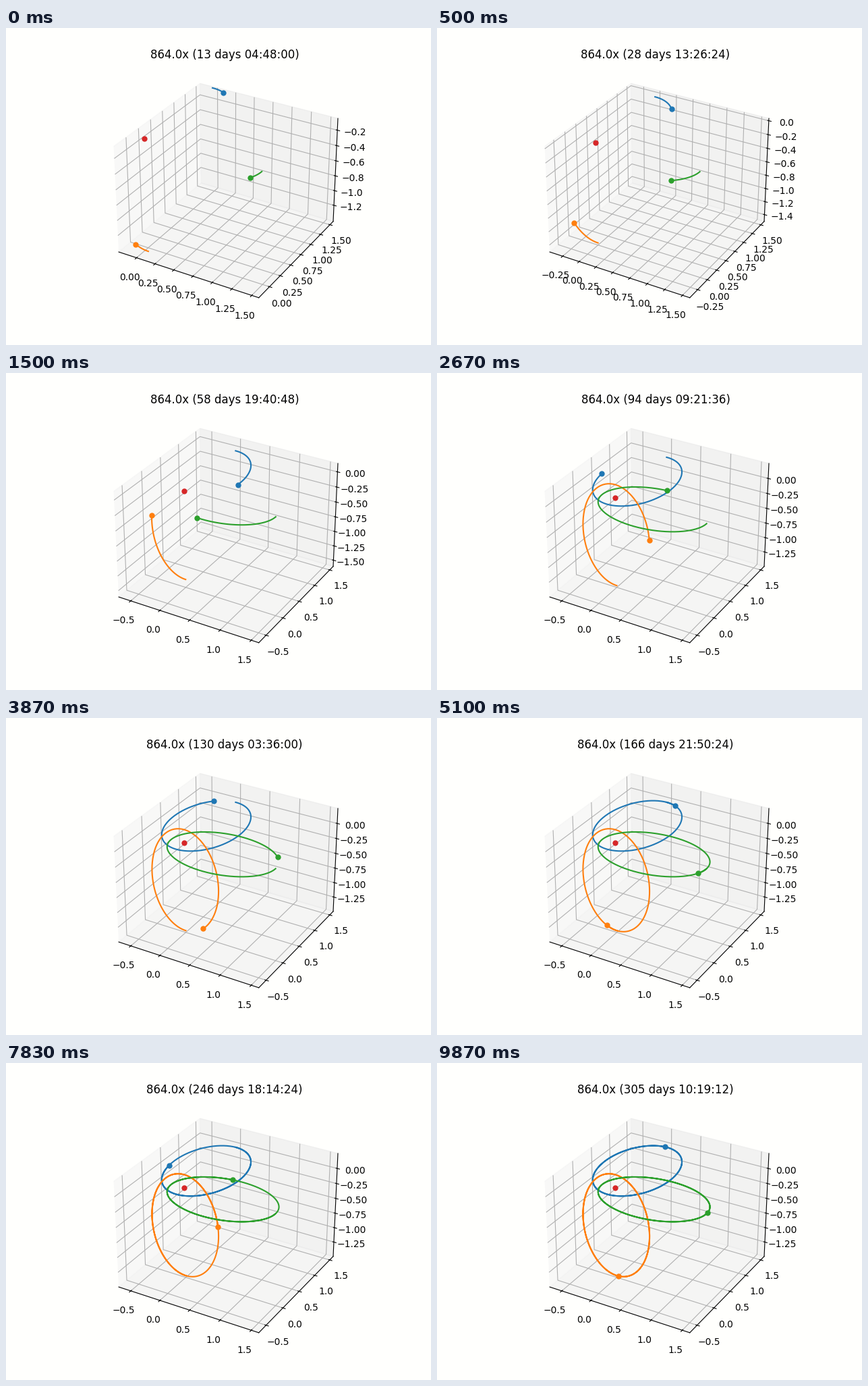
These frames come from a looping animation (630x470 px, 9910 ms). A matplotlib script:

```python
import numpy as np
import matplotlib.pyplot as plt
from matplotlib.animation import FuncAnimation
from matplotlib.ticker import MaxNLocator

W, H, DPI = 630, 470, 100
FRAMES, LOOP_MS = 298, 9910
SPEED = 864

# Kepler ellipse, released at its far point (lengths in 1e11 m, time in days)
FAR, PERIOD, A = 1.471, 153.77, 0.843
ECC = FAR / A - 1
B = A * np.sqrt(1 - ECC ** 2)
ANOMALY = np.linspace(0, 6 * np.pi, 6000)
MEAN = ANOMALY + ECC * np.sin(ANOMALY)

STEP = 0.5       # days between trail points
LAG = 3.5        # the view limits trail behind the bodies
MARGIN = 1.1 * 25 / 24
BACKGROUND = "#fffffd"

# Simulated days at a few frames; the clock slows slightly
CLOCK_FRAMES = [0, 15, 45, 80, 153, 235, 296]
CLOCK_DAYS = [13.20, 28.56, 58.82, 94.39, 166.91, 246.76, 305.43]


class InnerLocator(MaxNLocator):
    """Ticks kept out of the outer padding of the view."""

    def __call__(self):
        lo, hi = self.axis.get_view_interval()
        pad = (hi - lo) / 50
        return [t for t in self.tick_values(lo, hi)
                if lo + pad <= t <= hi - pad]


def bodies(days):
    """Positions of the three bodies, shaped (body, xyz, time)."""
    e = np.interp(2 * np.pi * days / PERIOD, MEAN, ANOMALY)
    along, across = A * (ECC + np.cos(e)), B * np.sin(e)
    zero = np.zeros_like(along)
    return np.array([(across, along, zero),
                     (-across, zero, -along),
                     (along, -across, zero)])


def trail(day):
    return bodies(np.append(np.arange(0, day, STEP), day))


def set_view(day):
    seen = trail(day)
    lo, hi = seen.min(axis=(0, 2)), seen.max(axis=(0, 2))
    mid = (lo + hi) / 2
    half = MARGIN * (hi - lo).max() / 2 * np.array([1, 1, 0.75])
    ax.set_xlim(mid[0] - half[0], mid[0] + half[0])
    ax.set_ylim(mid[1] - half[1], mid[1] + half[1])
    ax.set_zlim(mid[2] - half[2], mid[2] + half[2])


def clock_text(day):
    total = int(round(day * 100)) * 864
    days, rest = divmod(total, 86400)
    hours, rest = divmod(rest, 3600)
    minutes, seconds = divmod(rest, 60)
    return (f"{SPEED:.1f}x ({days} days "
            f"{hours:02d}:{minutes:02d}:{seconds:02d})")


def update(frame):
    day = np.interp(frame, CLOCK_FRAMES, CLOCK_DAYS)
    set_view(day - LAG)
    for path, line, dot in zip(trail(day), lines, dots):
        line.set_data_3d(*path)
        dot.set_data_3d(*path[:, -1:])
    title.set_text(clock_text(day))
    return [*lines, *dots, title]


fig = plt.figure(figsize=(W / DPI, H / DPI), dpi=DPI, facecolor=BACKGROUND)
ax = fig.add_axes([76 / W, 46.8 / H, 496 / W, 369.6 / H], projection="3d")
ax.set_facecolor(BACKGROUND)
for axis in (ax.xaxis, ax.yaxis, ax.zaxis):
    axis.set_major_locator(InnerLocator(nbins=8, steps=[1, 2, 2.5, 5, 10]))

title = fig.text(324 / W, 1 - 45.3 / H, "", size=12, ha="center",
                 va="baseline")
lines = [ax.plot([], [], [], color=f"C{i}")[0] for i in range(3)]
dots = [ax.plot([], [], [], "o", ms=5, color=f"C{i}")[0] for i in range(3)]
ax.plot([0], [0], [0], "o", ms=5, color="C3")

anim = FuncAnimation(fig, update, frames=FRAMES, interval=LOOP_MS / FRAMES,
                     repeat=True, repeat_delay=0)
plt.show()
```
